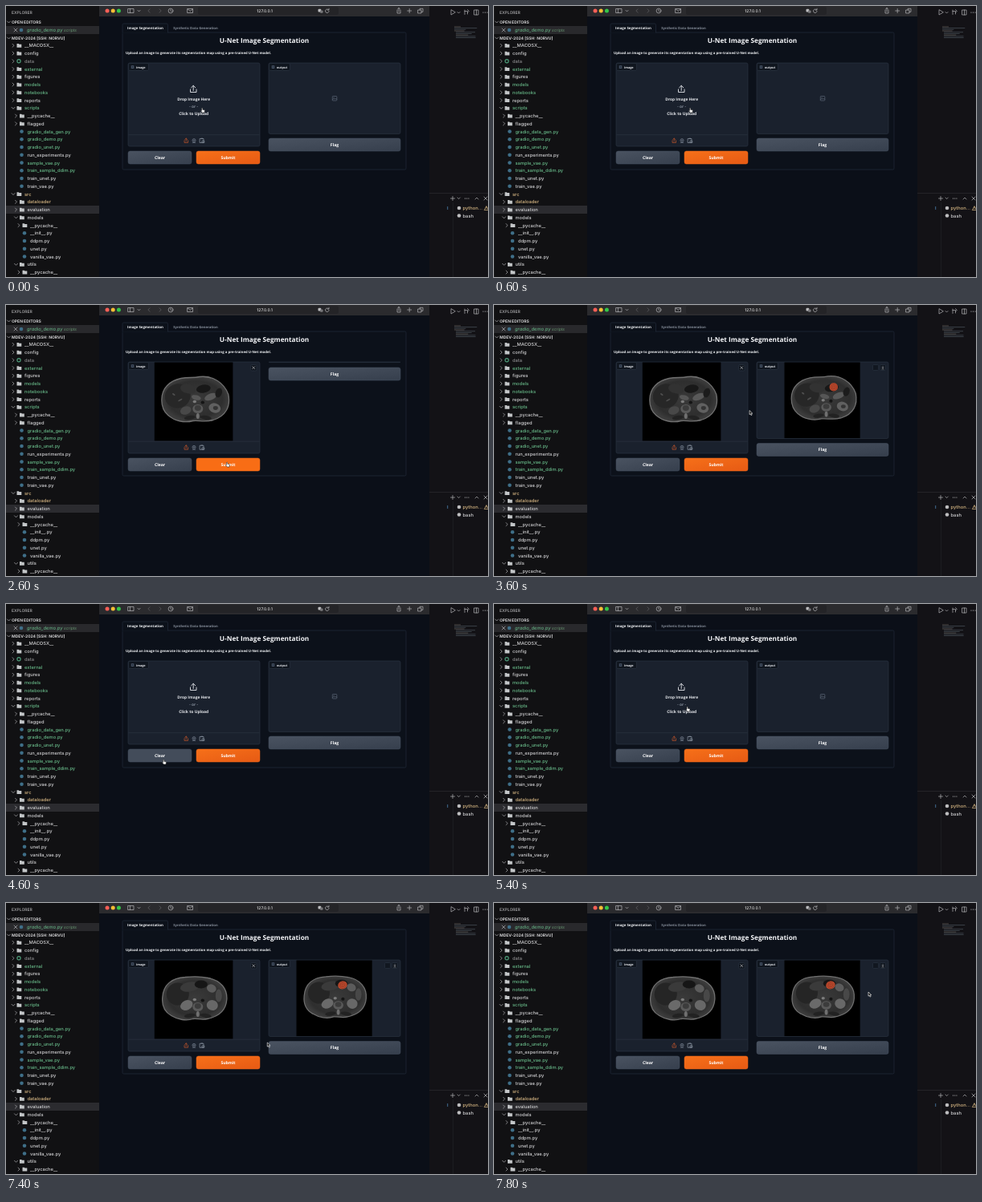
An HTML page that plays this animation: 600 px wide and 338 px high, repeating every 8000 ms.

```html
<!DOCTYPE html>
<html lang="en">
<head>
<meta charset="utf-8">
<title>Segmentation demo</title>
<style>
html, body { margin: 0; width: 100%; height: 100%; overflow: hidden; background: #131216; }
svg { display: block; width: 100vw; height: 100vh; text-rendering: geometricPrecision; }
.ui { font-family: Inter, Roboto, sans-serif; font-weight: 500; }
.bold { font-family: Inter, Roboto, sans-serif; font-weight: 700; }
.slant { font-family: Inter, Roboto, sans-serif; font-style: italic; }
.web { font-family: "Open Sans", "Noto Sans", sans-serif; font-weight: 700; }
.ln { fill: none; stroke: #b4b4b6; stroke-width: .7; stroke-linecap: round; stroke-linejoin: round; }
</style>
</head>
<body>
<svg id="stage" viewBox="0 0 600 338">
  <defs>
    <linearGradient id="grey" x2="1" y2="1"><stop stop-color="#4a5361"/><stop offset="1" stop-color="#363f4d"/></linearGradient>
    <linearGradient id="orange" x2="1" y2="1"><stop stop-color="#f67019"/><stop offset="1" stop-color="#e65a14"/></linearGradient>
    <radialGradient id="tissue"><stop stop-color="#3a3a3a"/><stop offset=".8" stop-color="#2e2e2e"/><stop offset="1" stop-color="#3c3c3c"/></radialGradient>
    <filter id="soft"><feGaussianBlur stdDeviation=".6"/></filter>
  </defs>
</svg>
<script>
const LOOP = 8000, STEP = 200;
const GREEN = '#68ba89', WHITE = '#d3d3d5', SAND = '#d9b985';
const stage = document.getElementById('stage');

const rect = (x, y, w, h, fill, more = '') =>
  `<rect x="${x}" y="${y}" width="${w}" height="${h}" fill="${fill}" ${more}/>`;
const dot = (x, y, r, fill, more = '') => `<circle cx="${x}" cy="${y}" r="${r}" fill="${fill}" ${more}/>`;
const oval = (x, y, rx, ry, fill, turn = 0) =>
  `<ellipse cx="${x}" cy="${y}" rx="${rx}" ry="${ry}" fill="${fill}" transform="rotate(${turn} ${x} ${y})"/>`;
const text = (x, y, size, s, fill = WHITE, cls = 'ui', more = '') =>
  `<text x="${x}" y="${y}" font-size="${size}" fill="${fill}" class="${cls}" ${more}>${s}</text>`;
const line = (d, more = '') => `<path d="${d}" class="ln" ${more}/>`;
const group = (id, body) => `<g id="${id}">${body}</g>`;
const mid = 'text-anchor="middle"';

// Sidebar tree: depth, kind (c closed, o open, p python file, d data folder), colour, name
const tree = [
  [0, 'c', WHITE, '__MACOSX__'], [0, 'c', WHITE, 'config'], [0, 'd', '#8a8a8c', 'data'],
  [0, 'c', GREEN, 'external'], [0, 'c', WHITE, 'figures'], [0, 'c', GREEN, 'models'],
  [0, 'c', GREEN, 'notebooks'], [0, 'c', WHITE, 'reports'], [0, 'o', GREEN, 'scripts'],
  [1, 'c', WHITE, '__pycache__'], [1, 'c', WHITE, 'flagged'], [1, 'p', GREEN, 'gradio_data_gen.py'],
  [1, 'p', GREEN, 'gradio_demo.py'], [1, 'p', GREEN, 'gradio_unet.py'], [1, 'p', WHITE, 'run_experiments.py'],
  [1, 'p', GREEN, 'sample_vae.py'], [1, 'p', GREEN, 'train_sample_ddim.py'], [1, 'p', WHITE, 'train_unet.py'],
  [1, 'p', WHITE, 'train_vae.py'], [0, 'o', SAND, 'src'], [1, 'c', SAND, 'dataloader'],
  [1, 'c', WHITE, 'evaluation'], [1, 'o', WHITE, 'models'], [2, 'c', WHITE, '__pycache__'],
  [2, 'p', WHITE, '__init__.py'], [2, 'p', WHITE, 'ddpm.py'], [2, 'p', WHITE, 'unet.py'],
  [2, 'p', WHITE, 'vanilla_vae.py'], [1, 'o', WHITE, 'utils'], [2, 'c', WHITE, '__pycache__']
];

const pyIcon = (x, y) => dot(x, y, 2.3, '#3f6f88');

function treeRow([depth, kind, color, name], i) {
  const y = 49.3 + i * 9.75, x = 23 + depth * 3.5, c = x - 14;
  let icon;
  if (kind === 'p') icon = pyIcon(x - 7, y);
  else {
    icon = line(kind === 'o' ? `M${c - 2} ${y - 1}l2 2l2 -2` : `M${c - 1} ${y - 2}l2 2l-2 2`);
    icon += kind === 'd'
      ? dot(x - 7, y, 2.1, 'none', 'stroke="#4d9a78" stroke-width="1.2"')
      : `<path d="M${x - 9.5} ${y - 2.3}h2.2l.8 .8h2.8v3.9h-5.8z" fill="#c3c6c8"/>`;
  }
  return icon + text(x, y + 2, 5.75, name, color);
}

function sidebar() {
  return rect(0, 0, 116, 338, '#111113') + rect(0, 25, 116, 10, '#29292c') + rect(0, 249, 116, 10, '#2b2b2f') +
    text(7, 10, 5, 'EXPLORER', '#b5b5b7') +
    text(7, 22, 5, 'OPEN EDITORS', WHITE, 'bold') + line('M1.5 19l2 2l2 -2') +
    line('M10 28l4 4m0 -4l-4 4') + pyIcon(19, 30) +
    text(26, 32, 5.85, 'gradio_demo.py', GREEN, 'slant') + text(72, 32, 5, 'scripts', '#66946f', 'slant') +
    text(7, 42, 5, 'MDEV-2024 [SSH: NORVU]', WHITE, 'bold') + line('M1.5 39l2 2l2 -2') +
    tree.map(treeRow).join('');
}

function editorRight() {
  let s = rect(527, 0, 73, 338, '#131216');
  let seed = 7;
  const rnd = () => (seed = seed * 16807 % 2147483647) / 2147483647;
  for (let i = 0; i < 9; i++) {
    const y = 25.5 + i * 1.7;
    s += rect(558 + (i > 3 ? 2 : 0), y, 8 + rnd() * 22, .8, i % 3 ? '#56616a' : '#77706a', 'opacity=".7"');
  }
  s += rect(527, 233, 73, .6, '#303034');
  s += line('M554 5v6l5 -3z') + line('M562 7.5l1.5 1.5l1.5 -1.5');
  s += line('M571 5v5.5m0 -4h3.5v3.5m0 -5.5l1.8 1.8l-1.8 1.8') + line('M583 5h5v6h-5zM585.5 5v6');
  s += [594, 596.5, 599].map(x => dot(x, 8, .6, WHITE)).join('');
  s += line('M553.5 240h5m-2.5 -2.5v5M562 239l1.6 1.6l1.6 -1.6M584 241l2 -2l2 2M595 238l4 4m0 -4l-4 4');
  s += [571.5, 573.7, 575.9].map(x => dot(x, 240, .55, WHITE)).join('');
  s += rect(556, 245, .5, 93, '#29292d') + rect(549.2, 250, 1, 4, '#416b91');
  s += dot(564, 252, 2.3, '#bdbdbf') + dot(564, 261.5, 2.3, '#bdbdbf');
  s += text(568.5, 254, 5.75, 'python...', SAND) + text(568.5, 263.5, 5.75, 'bash');
  return s + line('M595.5 254.2l2.5 -4.6l2.5 4.6zM598 251v1.5', 'style="stroke:#d9b985"');
}

function browser() {
  let s = rect(116, 0, 411, 338, '#0b0f18') + rect(116, 0, 411, 13, '#2b2b2e') +
    rect(239, 1, 175, 10, '#242427', 'rx="2"');
  ['#fb5f57', '#f6bd35', '#34c648'].forEach((c, i) => s += dot(126 + 7.2 * i, 6, 2.5, c));
  s += line('M152 3.5h7v5h-7zM154.4 3.5v5M164 5.4l1.5 1.5l1.5 -1.5');
  s += line('M179 3.8l-2.2 2.2l2.2 2.2M191 3.8l2.2 2.2l-2.2 2.2', 'opacity=".4"');
  s += dot(205, 6, 2.9, 'none', 'class="ln"') + line('M205 4.3v1.8l1.2 .8');
  s += line('M226 3.5h6.5v5h-6.5zM226.3 4l3 2.3l3 -2.3');
  s += text(322, 8, 5, '127.0.0.1', '#dededf', 'ui', mid);
  s += rect(388.5, 3.8, 3.8, 3.8, '#bcbcbe', 'rx="1"') + rect(391, 5.4, 3.6, 3.4, '#77777a', 'rx="1"');
  s += line('M401.5 4.7a2.3 2.3 0 1 0 .6 1.8M402 3.2v1.8h-1.8');
  s += line('M487 5v4h4v-4M489 7v-4.6m-1.4 1.3l1.4 -1.3l1.4 1.3M499.7 6h5m-2.5 -2.5v5');
  return s + line('M513 5h4v4h-4zM515 5v-1.7h4v4h-2');
}

const BORDER = 'stroke="#2d3644" stroke-width=".6"';
const block = (id, x, h) => rect(x, 71, 164, h, '#1a212d', `id="${id}" rx="2" ${BORDER}`);
const chip = (x, w, s) => rect(x, 71.5, w, 9, '#10161f', `rx="1.5" ${BORDER}`) +
  rect(x + 3.3, 74.4, 3.4, 3.4, '#546174') + rect(x + 4.1, 75.2, 1.8, 1.8, '#1d2735') +
  text(x + 9.5, 77.5, 3.8, s, '#e4e6ea', 'web');
const button = (id, x, w, s, paint) => group(id,
  rect(x, 0, w, 16, `url(#${paint})`, `rx="2.5" stroke="${paint === 'grey' ? '#475160' : '#f0691a'}" stroke-width=".5"`) +
  text(x + w / 2, 9.8, 5.1, s, '#fff', 'web', mid));

// Abdominal slice in a 98-unit square
function scan(second) {
  const body = second
    ? 'M10 46C11 30 22 22 38 21C48 20 58 20 67 22C83 25 91 36 90 49C89 63 80 70 66 73C58 75 53 72 48 73C40 76 29 74 21 69C12 64 9 56 10 46Z'
    : 'M9 47C9 32 19 23 33 20C42 18 48 20 56 18C73 16 87 26 92 40C95 55 89 67 73 72C62 75 55 72 48 73C37 76 25 73 17 66C11 61 9 55 9 47Z';
  const organs = second
    ? oval(29, 42, 14, 14, '#252525', 20) + oval(44, 33, 12, 6, '#3a3a3a', -10) +
      oval(58, 30, 8, 5, '#161616') + oval(71, 35, 6, 5, '#5c5c5c', 25) + oval(80, 44, 4, 8, '#484848') +
      oval(40, 56, 8, 6, '#6a6a6a', -25) + oval(72, 56, 7, 6.5, '#686868', 20)
    : oval(29, 42, 16, 15, '#272727', -18) + oval(42, 33, 10, 6, '#323232', 12) +
      oval(61, 33, 9, 5, '#181818', -10) + oval(70, 43, 8, 4, '#595959', -22) + oval(80, 38, 4, 6, '#1c1c1c', 20) +
      oval(52, 44, 6, 3, '#565656', 15) + oval(39, 60, 7, 5, '#484848', -20) + oval(75, 57, 7.5, 6, '#606060', 16) +
      oval(76, 57, 3, 2.4, '#343434') + oval(24, 40, 2, 1, '#505050', 35) + oval(32, 47, 3, 1, '#4c4c4c', -30);
  return rect(0, 0, 97.6, 98, '#000') + '<g filter="url(#soft)">' +
    `<path d="${body}" fill="url(#tissue)" stroke="#707070" stroke-width="1.3"/>` + organs +
    oval(54, 58, 6.5, 5.5, '#5a5a5a') + oval(54, 57, 4, 3.4, '#3c3c3c') + oval(54, 67, 2, 3.5, '#707070') +
    oval(44, 69, 7, 2.5, '#222', -8) + oval(64, 69, 7, 2.5, '#222', 8) +
    oval(50, 49, 2.2, 1.8, '#7c7c7c') + oval(60, 50, 2.2, 2, '#151515') + '</g>';
}

function mask(second) {
  const x = second ? 59.5 : 63.5, y = 32;
  let s = oval(x, y, second ? 6 : 5.4, 5.2, '#cb4f30', second ? -20 : 0);
  for (let r = 1.3; r < 5; r += 1.5) s += dot(x, y, r, 'none', 'stroke="#6e2b1d" stroke-width=".55"');
  return s;
}

const tools = group('tools',
  line('M222 -.2v2.6h4.5v-2.6M224.2 1v-3.9m-1.6 1.5l1.6 -1.5l1.6 1.5', 'style="stroke:#c4562b"') +
  dot(234, -.4, 2, 'none', 'stroke="#737d8c" stroke-width=".8"') + dot(234, -.4, .8, '#737d8c') +
  line('M232.3 2.5h3.4', 'style="stroke:#737d8c"') +
  line('M241.5 -2.5h4.5v5h-4.5zM243 -2.8h1.6M244.3 .2h2.5v2.3h-2.5z', 'style="stroke:#8f98a5"'));

function page() {
  return rect(145, 33, 353, 171, '#0c111a', 'id="panel" rx="1.5" stroke="#273040" stroke-width=".6"') +
    `<path d="M145 33.4V23.5q0 -1.5 1.5 -1.5H200q1.5 0 1.5 1.5V33.4" fill="#0c111a" stroke="#273040" stroke-width=".6"/>` +
    text(173.4, 29.2, 4.35, 'Image Segmentation', '#eef0f3', 'web', mid) +
    text(236, 29.2, 4.2, 'Synthetic Data Generation', '#858d99', 'web', mid) +
    text(321.5, 46, 8.25, 'U-Net Image Segmentation', '#f4f5f8', 'web', mid) +
    text(149, 60, 4.3, 'Upload an image to generate its segmentation map using a pre-trained U-Net model.', '#eef0f3', 'web') +
    block('inBox', 152, 104) +
    group('drop',
      line('M229.5 104v3.5h7.5v-3.5M233.2 105.5v-6.2m-2.6 2.5l2.6 -2.5l2.6 2.5', 'style="stroke:#e5e7eb;stroke-width:.9"') +
      text(233.7, 118, 4.85, 'Drop Image Here', '#e8eaee', 'web', mid) +
      text(233.7, 126.5, 4.8, '- or -', '#858e9b', 'web', mid) +
      text(233.7, 135.7, 4.95, 'Click to Upload', '#e8eaee', 'web', mid)) +
    group('picture',
      `<g transform="translate(184.8 71.5)">${group('in0', scan(false))}${group('in1', scan(true))}</g>` +
      rect(304.5, 74.5, 7.5, 7.5, '#111720', `rx="1.5" ${BORDER}`) +
      line('M306.8 76.8l2.9 2.9m0 -2.9l-2.9 2.9')) +
    rect(152.3, 0, 163.4, .6, '#2d3644', 'id="rule"') + tools + chip(152.5, 25, 'image') +
    button('clear', 152, 79, 'Clear', 'grey') + button('submit', 237, 79, 'Submit', 'orange') +
    block('outBox', 327, 89) +
    group('blank', rect(406.3, 112.5, 5.5, 5.5, 'none', 'rx=".8" stroke="#667181" stroke-width=".6"') +
      line('M406.5 117l1.7 -1.8l1.3 1l1 -1l1.2 1.3', 'style="stroke:#667181;stroke-width:.6"') + dot(408, 114.2, .5, '#667181')) +
    group('result',
      `<g transform="translate(361.5 71.5) scale(.965)">` +
      group('out0', scan(false) + mask(false)) + group('out1', scan(true) + mask(true)) + '</g>' +
      [471.5, 480.5].map(x => rect(x, 74.5, 7, 7, '#111720', `rx="1.2" ${BORDER}`)).join('') +
      line('M484 76.4v2.3m-1 -.9l1 1l1 -1M482.8 80h2.4', 'style="stroke-width:.5"')) +
    group('outChip', chip(327.5, 26, 'output')) +
    button('flag', 327, 164, 'Flag', 'grey');
}

const cursors =
  `<path id="arrow" d="M0 0V5.2L1.2 4.1L2.1 6.1L3.1 5.6L2.2 3.7H3.8Z" fill="#111" stroke="#fff" stroke-width=".6"/>` +
  `<path id="hand" d="M0 .5Q.7 -.4 1.3 .5V2.3L3.6 2.8Q4.2 3 4 3.8L3.5 6H.8L-1 3.8Q-1 2.9 0 3.4Z" fill="#f5f5f5" stroke="#111" stroke-width=".5"/>`;

stage.innerHTML += sidebar() + editorRight() + browser() + page() + group('cursor', cursors);

const el = {};
stage.querySelectorAll('[id]').forEach(n => el[n.id] = n);
const show = (id, on) => el[id].style.display = on ? '' : 'none';
const lower = (id, y) => el[id].setAttribute('transform', `translate(0 ${y})`);
const height = (id, h) => el[id].setAttribute('height', h);
const paint = (id, fill) => el[id].firstChild.setAttribute('fill', fill);

// Pointer tip: time, x, y
const path = [
  [0, 243.5, 127], [800, 243.5, 127], [1400, 274.5, 196], [3400, 274.5, 196], [3600, 318, 131.5],
  [3800, 318, 131.5], [4400, 195.5, 194], [4800, 195.5, 194], [5400, 240, 128], [5800, 240, 128],
  [6400, 315.5, 178.5], [6600, 276, 196], [7200, 276, 196], [7800, 466, 111], [LOOP, 466, 111]
];

function pointer(t) {
  const i = path.findIndex(p => p[0] > t), a = path[i - 1], b = path[i];
  const u = (t - a[0]) / (b[0] - a[0]), k = u * u * (3 - 2 * u);
  return [a[1] + (b[1] - a[1]) * k, a[2] + (b[2] - a[2]) * k];
}

function draw(time) {
  const t = Math.floor((time % LOOP) / STEP) * STEP;
  const second = t >= 4600;
  const [load, wait, done] = second ? [6000, 7200, 7400] : [1000, 2600, 2800];
  const loaded = t >= load, ready = t >= done, folded = t >= wait && !ready;
  const buttonY = loaded ? 191 : 181;

  show('drop', !loaded);
  show('picture', loaded);
  for (const side of ['in', 'out']) {
    show(side + 0, !second);
    show(side + 1, second);
  }
  height('inBox', loaded ? 114 : 104);
  height('panel', loaded ? 180 : 171);
  lower('rule', loaded ? 169.8 : 160.5);
  lower('tools', loaded ? 177.8 : 168);
  lower('clear', buttonY);
  lower('submit', buttonY);

  height('outBox', folded ? .6 : ready ? 95.5 : 88.5);
  show('blank', !ready && !folded);
  show('result', ready);
  show('outChip', !folded);
  lower('flag', folded ? 78 : ready ? 172.5 : 165);

  const [x, y] = pointer(t);
  const inRow = y > buttonY && y < buttonY + 16;
  const onClear = inRow && x > 152 && x < 231, onSubmit = inRow && x > 237 && x < 316;
  const onDrop = !loaded && x > 152 && x < 316 && y > 71 && y < 160;
  paint('clear', onClear ? '#434c5a' : 'url(#grey)');
  paint('submit', onSubmit ? '#f86d15' : 'url(#orange)');
  const hand = onClear || onSubmit || onDrop;
  show('hand', hand);
  show('arrow', !hand);
  el.cursor.setAttribute('transform', `translate(${x} ${y})`);
}

const start = performance.now();
function tick() {
  draw(performance.now() - start);
  requestAnimationFrame(tick);
}
tick();
</script>
</body>
</html>
```
